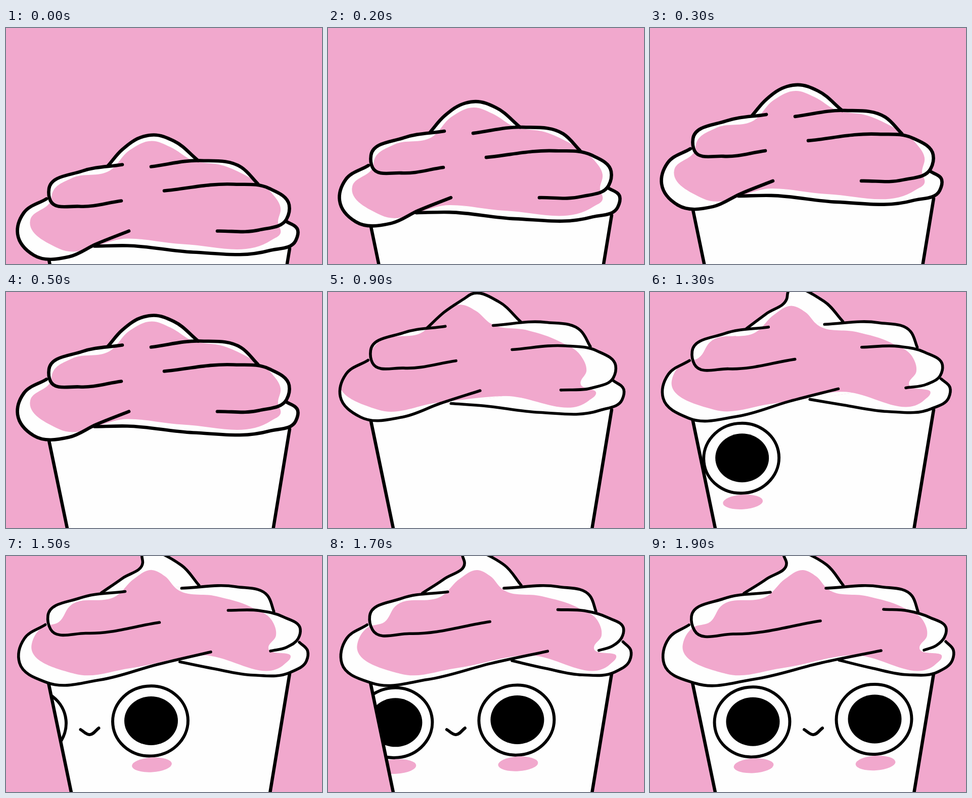
Recreate the animation shown at these times as an HTML page with a canvas. Size 625 by 469 pixels, loop 2 s.

```html
<!DOCTYPE html>
<html lang="en">
<head>
<meta charset="utf-8">
<title>Cupcake turning round</title>
<style>
html, body { margin: 0; width: 100%; height: 100%; overflow: hidden; background: #f1a8cd; }
canvas { display: block; }
</style>
</head>
<body>
<canvas id="stage" width="625" height="469"></canvas>
<script>
const ctx = document.getElementById('stage').getContext('2d');
const PINK = '#f1a8cd', WHITE = '#fefefe', INK = '#000';
const STEP = 100, STEPS = 20, TURN_START = 6, TURN_END = 19;

// Each fold of frosting eases from one curve to another while the cupcake turns.
// A higher power makes it settle sooner.
const peak = {
  power: 1.5,
  from: [202,69, 230,37, 272,11, 292,8, 332,20, 380,59],
  to: [186,74, 230,46, 270,14, 264,-3, 350,18, 382,58],
};
const middleLeft = {
  power: 1,
  from: [230,67, 150,80, 85,115, 88,139, 145,150, 228,139],
  to: [238,72, 145,85, 82,120, 88,148, 165,155, 337,129],
};
const middleRight = {
  power: 4,
  from: [287,71, 385,59, 465,72, 498,105],
  to: [348,64, 455,61, 518,79, 530,110],
};
const lowerRight = {
  power: 1.6,
  from: [313,119, 450,106, 520,114, 560,147, 555,175, 500,197, 418,199],
  to: [462,106, 510,109, 553,122, 586,145, 582,162, 566,178, 542,187],
};
const lowerLeft = {
  power: 1.2,
  from: [80,135, 35,163, 23,205, 55,247, 125,250, 178,225, 243,199],
  to: [77,137, 37,164, 28,215, 90,253, 205,245, 340,212, 457,188],
};
const rim = {
  power: 1.6,
  from: [175,229, 240,228, 370,241, 520,238, 573,218, 577,197, 553,179],
  to: [374,207, 440,223, 510,236, 570,230, 598,207, 600,187, 585,170],
};
const icing = {
  power: 4,
  from: [288,20, 325,32, 368,58, 430,69, 475,89, 525,123, 543,153, 538,182, 543,203, 525,217,
    350,225, 240,214, 105,234, 48,177, 88,140, 93,120, 130,94, 205,79, 245,38],
  to: [303,28, 328,40, 352,66, 430,80, 500,102, 540,128, 548,158, 533,183, 577,202, 565,215,
    400,197, 260,223, 150,234, 65,175, 84,143, 119,131, 140,100, 233,79, 268,45],
};

const clamp01 = v => Math.min(Math.max(v, 0), 1);
const mix = (a, b, k) => a + (b - a) * k;
const last = list => list[list.length - 1];

function pointsAt({ power, from, to }, step, shift = 0) {
  const turn = clamp01((step - TURN_START) / (TURN_END - TURN_START));
  const k = 1 - (1 - turn) ** power;
  const points = [];
  for (let i = 0; i < from.length; i += 2) {
    points.push([mix(from[i], to[i], k) + shift, mix(from[i + 1], to[i + 1], k)]);
  }
  return points;
}

// Unit tangent at b of the arc through a, b and c.
function tangent(a, b, c) {
  const before = Math.hypot(b[0] - a[0], b[1] - a[1]) || 1e-6;
  const after = Math.hypot(c[0] - b[0], c[1] - b[1]) || 1e-6;
  const [x, y] = [0, 1].map(i =>
    (b[i] - a[i]) * after / before + (c[i] - b[i]) * before / after);
  const length = Math.hypot(x, y) || 1;
  return [x / length, y / length];
}

// Smooth curve through all points.
function spline(points, closed = false) {
  const n = points.length;
  const at = i => closed ? points[(i + n) % n] : points[Math.min(Math.max(i, 0), n - 1)];
  const direction = i => {
    if (!closed && i === 0) return tangent(at(0), at(0.5 + 0.5), at(1));
    if (!closed && i === n - 1) return tangent(at(n - 2), at(n - 2), at(n - 1));
    return tangent(at(i - 1), at(i), at(i + 1));
  };
  const path = new Path2D();
  path.moveTo(...points[0]);
  for (let i = 0; i < (closed ? n : n - 1); i++) {
    const a = at(i), b = at(i + 1);
    const handle = 0.35 * Math.hypot(b[0] - a[0], b[1] - a[1]);
    const u = direction(i), v = direction(i + 1);
    path.bezierCurveTo(a[0] + u[0] * handle, a[1] + u[1] * handle,
      b[0] - v[0] * handle, b[1] - v[1] * handle, ...b);
  }
  return path;
}

function polygon(points) {
  const path = new Path2D();
  points.forEach(p => path.lineTo(...p));
  path.closePath();
  return path;
}

function ellipse(x, y, rx, ry, tilt = 0) {
  const path = new Path2D();
  path.ellipse(x, y, rx, ry, tilt, 0, Math.PI * 2);
  return path;
}

function fill(path, color) {
  ctx.fillStyle = color;
  ctx.fill(path);
}

function ink(path, width) {
  ctx.strokeStyle = INK;
  ctx.lineWidth = width;
  ctx.stroke(path);
}

function drawEye(x) {
  const y = 324 + (443 - x) * 0.022;
  ink(ellipse(x, y + 0.5, 74.5, 69.5, -0.1), 6);
  fill(ellipse(x + 1.5, y, 53, 48.5), INK);
  fill(ellipse(x + 3, y + 87.5, 39.5, 14.5, -0.06), PINK);
}

function drawFace(step) {
  const left = TURN_END - step;
  const x = 443 - 30.7 * left - 2.17 * left * left;
  drawEye(x);
  drawEye(x - 241);
  ink(spline([[x - 138, 345], [x - 120, 355], [x - 102, 342]]), 6);
}

function drawCup(step) {
  const cup = polygon([[84, 250], [132, 484], [520, 484], [561, 232], [374, 205], [220, 222]]);
  fill(cup, WHITE);
  ctx.save();
  ctx.clip(cup);
  drawFace(step);
  ctx.restore();
  ink(new Path2D('M84 252 L132 484 M561 234 L520 484'), 6.5);
}

function drawFrosting(step) {
  const folds = [peak, middleLeft, middleRight, lowerRight, lowerLeft, rim].map(f => pointsAt(f, step));
  const [top, , right, , left, edge] = folds;
  const curves = folds.map(f => spline(f));
  fill(polygon([top[0], last(top), last(right), last(edge), edge[0], left[0]]), WHITE);
  curves.forEach(c => fill(c, WHITE));

  // The icing swings left as the turn begins, then drifts back.
  const swing = Math.min(clamp01((step - 6) / 3), (TURN_END - step) / 10);
  fill(spline(pointsAt(icing, step, -35 * swing), true), PINK);

  const width = mix(6.6, 5.6, clamp01((step - 5) / 4));
  curves.forEach(c => ink(c, width));
}

function draw(now) {
  const step = Math.floor(now / STEP) % STEPS;
  ctx.fillStyle = PINK;
  ctx.fillRect(0, 0, 625, 469);
  ctx.lineCap = ctx.lineJoin = 'round';
  ctx.save();
  ctx.translate(0, Math.max(0, 204.5 - 33.2 * step));
  drawCup(step);
  drawFrosting(step);
  ctx.restore();
  requestAnimationFrame(draw);
}
requestAnimationFrame(draw);
</script>
</body>
</html>
```
